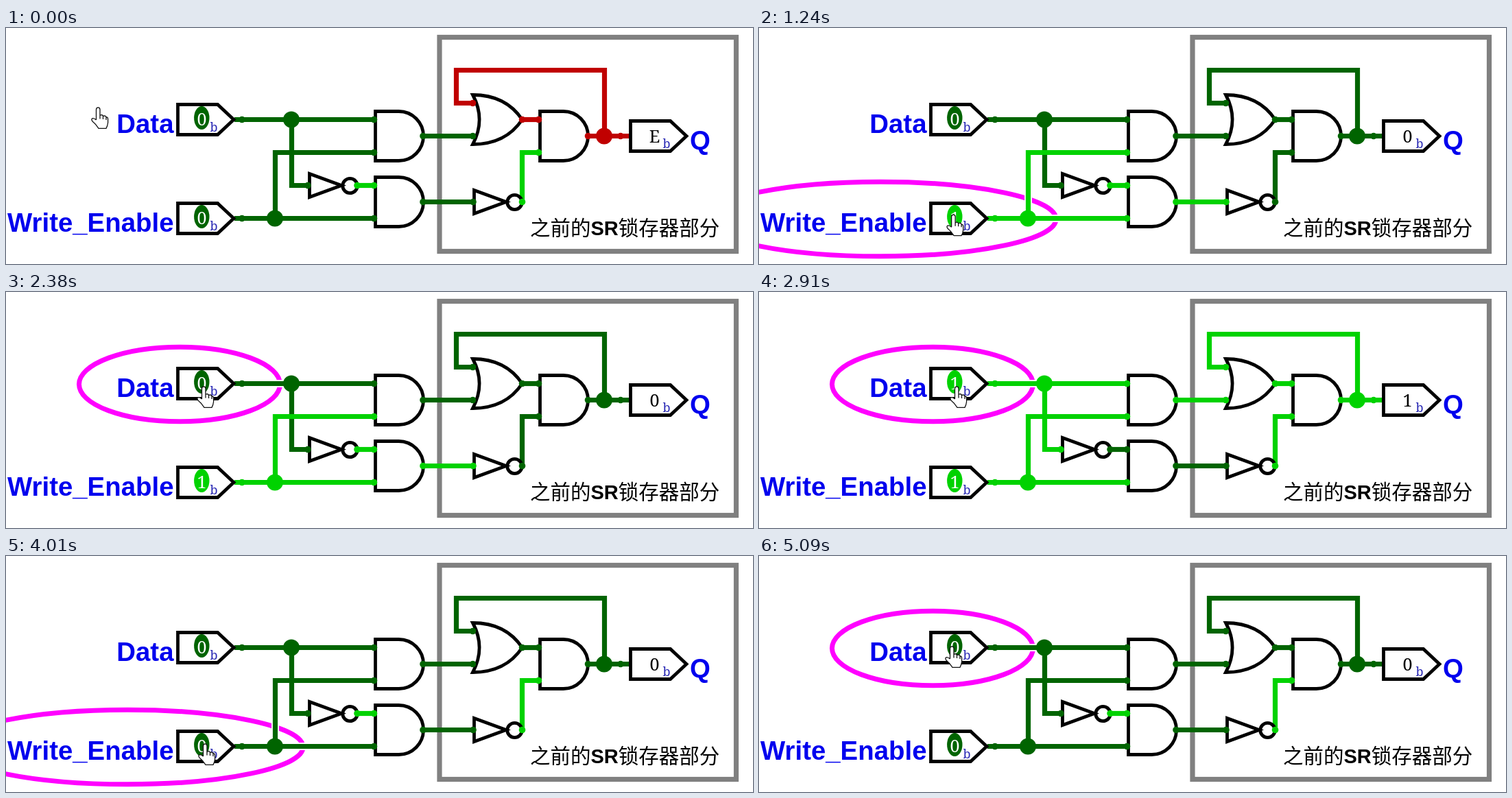
An HTML page for the animation above (5.89 s loop, 1089x344 px).

```html
<!DOCTYPE html>
<html lang="zh">
<head>
<meta charset="utf-8">
<style>
  html, body { margin: 0; width: 100%; height: 100%; overflow: hidden; background: #fff; }
  svg { display: block; width: 100vw; height: 100vh; }
  .net path, .halo { fill: none; stroke-width: 7.2; }
  .halo { stroke: #fff; stroke-width: 11; }
  .net circle { stroke: none; }
  .part { fill: none; stroke: #000; stroke-width: 4.8; }
  .ring { fill: none; stroke: #f0f; stroke-width: 7; }
  .name { font: bold 38.4px "Liberation Sans", Arial, sans-serif; fill: #00e; }
  .note { font: 500 29.5px "Noto Sans CJK SC", "Noto Sans CJK", sans-serif; }
  .note tspan { font: bold 29px "Liberation Sans", Arial, sans-serif; }
  .bit { font: 200 25px "Noto Serif", serif; text-anchor: middle; }
  .unit { font: 200 18px "Noto Serif", serif; text-anchor: middle; fill: #2828b4; }
</style>
</head>
<body>
<svg viewBox="0 0 1089 344">
  <defs>
    <path id="and" class="part" d="M538.5 121.5H572.5A36 36 0 0 1 572.5 193.5H538.5Z"/>
    <g id="not" class="part">
      <path d="M442.5 212.5V246.5L489 229.5Z"/>
      <circle cx="501.5" cy="230" r="10.7"/>
    </g>
    <path id="pin" class="part" d="M250.5 111.5H308.5L332 133.5L308.5 155.5H250.5Z"/>
  </defs>
  <rect x="632" y="13.5" width="432.5" height="312" fill="none" stroke="#808080" stroke-width="7.2"/>
  <ellipse class="ring" id="ringD" cx="253" cy="134.5" rx="146.5" ry="54.3"/>
  <ellipse class="ring" id="ringW" cx="177" cy="278.5" rx="256" ry="54.3"/>
  <path class="halo" d="M344 133.5H537M344 277.5H537M392.5 277.5V185"/>
  <g id="lines"></g>
  <use href="#and"/>
  <use href="#and" y="96"/>
  <use href="#and" x="240"/>
  <use href="#not"/>
  <use href="#not" x="240" y="24"/>
  <path class="part" d="M752.5 133.5Q728.5 97.5 680.5 97.5Q699.7 133.5 680.5 169.5Q728.5 169.5 752.5 133.5Z"/>
  <use href="#pin"/>
  <use href="#pin" y="144"/>
  <use href="#pin" x="660" y="24"/>
  <g id="dots"></g>
  <ellipse id="ovalD" cx="285.3" cy="131" rx="11.2" ry="17"/>
  <ellipse id="ovalW" cx="285.3" cy="275" rx="11.2" ry="17"/>
  <text class="bit" id="bitD" x="285.5" y="141.5" fill="#fff"></text>
  <text class="bit" id="bitW" x="285.5" y="285.5" fill="#fff"></text>
  <text class="bit" id="bitQ" x="945.5" y="167"></text>
  <text class="unit" x="303" y="150.5">b</text>
  <text class="unit" x="303" y="294.5">b</text>
  <text class="unit" x="963" y="174.5">b</text>
  <text class="name" x="244.5" y="153" text-anchor="end">Data</text>
  <text class="name" x="244.5" y="297" text-anchor="end">Write_Enable</text>
  <text class="name" x="997" y="177">Q</text>
  <text class="note" x="764" y="302">之前的<tspan>SR</tspan>锁存器部分</text>
  <path id="hand" fill="#fff" stroke="#111" stroke-width="1.3" stroke-linejoin="round"
    d="M131.5 134V119Q131.5 115.8 134.3 115.8Q137 115.8 137 119V127.5Q140.5 125.5 141.5 128.5Q145 127 146 130Q148.6 129.5 148.6 133V138Q148 143 146 146.3H135Q131 140 126 136Q123.5 132.5 126.5 131.6Q129 131.5 131.5 134M137 127V132.5M141.5 128.5V133M146 130V134"/>
</svg>
<script>
const LOOP = 5890, TICK = 67.5;
const COLORS = { 0: '#006400', 1: '#00d200', E: '#c00000' };

// net: [wire path, dots as x, y, radius]
const nets = {
  d: ['M333 133.5H537M416.5 133.5V229.5H440',
    [[344, 133.5], [416, 133.5, 12], [536.5, 133.5], [440, 229.5]]],
  w: ['M333 277.5H537M392.5 277.5V181.5H537',
    [[344, 277.5], [392, 277.5, 12], [536.5, 181.5], [536.5, 277.5]]],
  notD: ['M512 229.5H537', [[512, 229.5], [536.5, 229.5]]],
  set: ['M608 157.5H681', [[608, 157.5], [680.5, 157.5]]],
  reset: ['M608 253.5H681', [[608, 253.5], [681, 253.5]]],
  keep: ['M752.5 253.5V181.5H777', [[752.5, 253.5], [776.5, 181.5]]],
  or: ['M752.5 133.5H777', [[752.5, 133.5], [776.5, 133.5]]],
  q: ['M848 157.5H909M872.5 157.5V61.5H656.5V109.5H681',
    [[848.5, 157.5], [872, 157.5, 12], [896, 157.5], [680.5, 109.5]]],
};

// time, Data, Write_Enable, Q, ringed input
const states = [
  [0, 0, 0, 'E', ''],
  [900, 0, 1, 0, 'W'],
  [1920, 1, 1, 1, 'D'],
  [2250, 0, 1, 0, 'D'],
  [2780, 1, 1, 1, 'D'],
  [3130, 0, 1, 0, 'D'],
  [3740, 0, 0, 0, 'W'],
  [4560, 1, 0, 0, 'D'],
  [4960, 0, 0, 0, 'D'],
];

// time, x, y of the pointer relative to its start
const stops = [
  [0, 0, 0], [540, 167, 157], [670, 167, 157], [810, 149, 160], [1150, 149, 160],
  [1820, 154, 22], [3190, 154, 22], [3510, 160, 140], [3645, 156, 158],
  [3980, 156, 158], [4455, 147, 16], [LOOP, 147, 16],
];

const $ = id => document.getElementById(id);
const smooth = p => p * p * (3 - 2 * p);

function addNet(layer, markup) {
  const g = document.createElementNS('http://www.w3.org/2000/svg', 'g');
  g.setAttribute('class', 'net');
  g.innerHTML = markup;
  $(layer).append(g);
  return g;
}

const groups = {};
for (const [key, [path, dots]] of Object.entries(nets)) {
  groups[key] = [
    addNet('lines', `<path d="${path}"/>`),
    addNet('dots', dots.map(([x, y, r = 4.8]) => `<circle cx="${x}" cy="${y}" r="${r}"/>`).join('')),
  ];
}

function showState([, d, w, q, ring]) {
  const set = d & w, reset = (1 - d) & w;
  const values = { d, w, notD: 1 - d, set, reset, keep: 1 - reset, or: set || q, q };
  for (const [key, value] of Object.entries(values)) {
    for (const g of groups[key]) {
      g.setAttribute('stroke', COLORS[value]);
      g.setAttribute('fill', COLORS[value]);
    }
  }
  $('ovalD').setAttribute('fill', COLORS[d]);
  $('ovalW').setAttribute('fill', COLORS[w]);
  $('bitD').textContent = d;
  $('bitW').textContent = w;
  $('bitQ').textContent = q;
  for (const name of 'DW') $('ring' + name).style.display = ring === name ? '' : 'none';
}

function moveHand(t) {
  const i = stops.findIndex(s => s[0] > t);
  const [t0, x0, y0] = stops[i - 1], [t1, x1, y1] = stops[i];
  const p = smooth((t - t0) / (t1 - t0));
  $('hand').setAttribute('transform', `translate(${x0 + (x1 - x0) * p} ${y0 + (y1 - y0) * p})`);
}

let shown;
function draw() {
  const t = performance.now() % LOOP;
  const state = states.findLast(s => s[0] <= t);
  if (state !== shown) showState(shown = state);
  moveHand(Math.floor(t / TICK) * TICK);
  requestAnimationFrame(draw);
}
draw();
</script>
</body>
</html>
```
